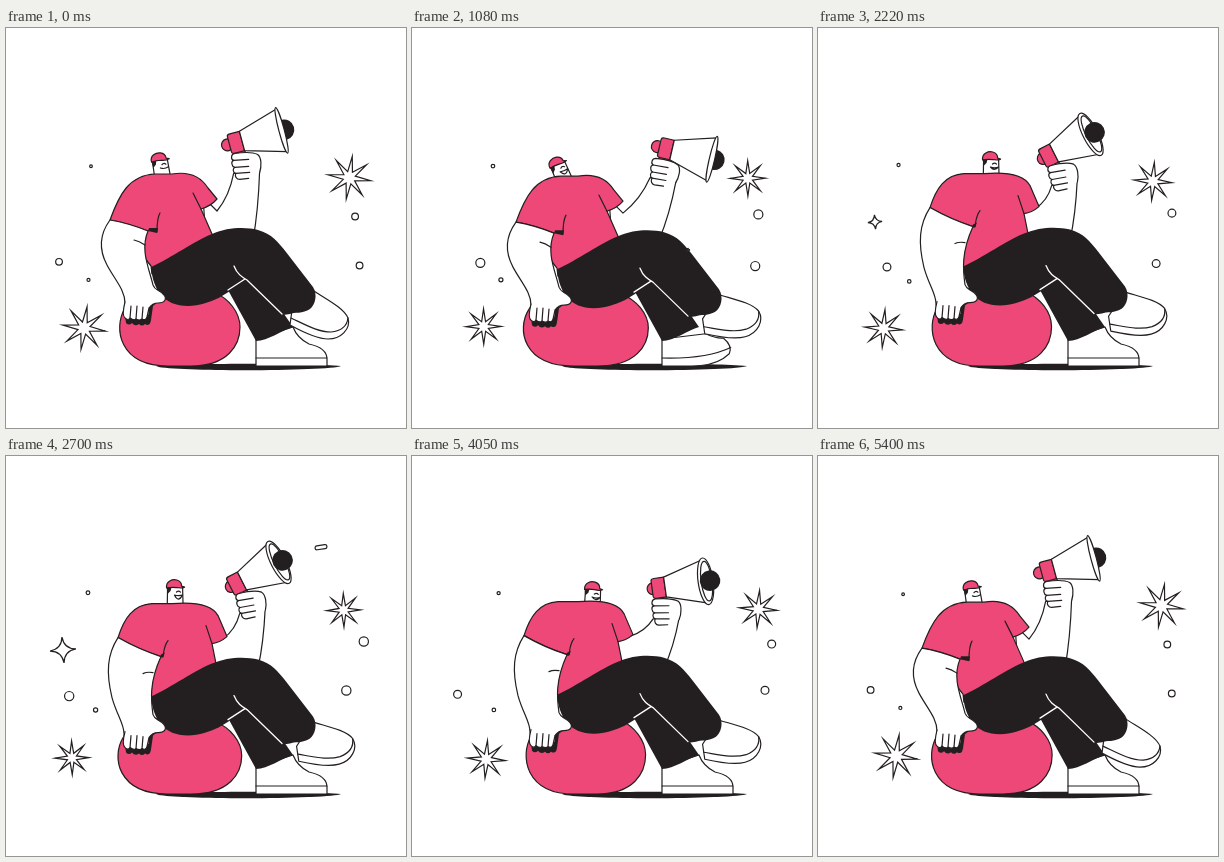
These frames come from a looping animation (400 by 400 pixels, 5.43 s). An HTML page:

```html
<!DOCTYPE html>
<html lang="en">
<head>
<meta charset="utf-8">
<title>Megaphone</title>
<style>
  html, body { margin: 0; width: 100%; height: 100%; overflow: hidden; background: #fff; }
  svg { display: block; width: 100vw; height: 100vh; }
  .w, .p, .l { stroke: #231f20; stroke-width: 1.2; stroke-linejoin: round; stroke-linecap: round; }
  .w { fill: #fff; }
  .p { fill: #ee4878; }
  .l { fill: none; }
  .k { fill: #231f20; }
  .s { fill: none; stroke: #fff; stroke-width: 1.3; stroke-linecap: round; }
  #bits .w { stroke-linejoin: miter; stroke-miterlimit: 8; }
</style>
</head>
<body>
<svg viewBox="0 0 400 400">
  <path class="k" d="M150 338.500C185 335 300 335 335 338C325 343 175 344 150 338.500Z"/>
  <path id="ball" class="p" d="M119 280C107 300 113 338 162 338H185C222 338 234 317 234 299C234 284 222 270 209 265C180 255 130 258 119 280Z"/>

  <path id="backArm" class="w"/>
  <g id="horn">
    <path class="p" d="M-11 8L-10 19H1L0 8Z"/>
    <circle id="knob" class="p" r="6"/>
    <path class="p" d="M-13 -8Q-13 -10 -10 -10H0V10H-10Q-13 10 -13 8Z"/>
    <circle id="ballBack" class="k" r="10.300"/>
    <path class="w" d="M0 -10L41 -22V22L0 10Z"/>
    <ellipse id="rim" class="w" cx="41" ry="23.500"/>
    <ellipse id="rimIn" class="w" cx="42" ry="20"/>
    <circle id="ballFront" class="k" r="10.300"/>
  </g>
  <g id="fist">
    <path class="w" d="M16 6C18 0 18 -9 14 -12C8 -15 -2 -14 -9 -13C-13 -12 -13 -7 -10 -6C-13 -5 -12 0 -9 1C-11 2 -11 6 -8 7C-9 10 -7 13 -4 13L5 12"/>
    <path class="l" d="M-10 -6L5 -7M-9 1L5 0M-8 7L6 6"/>
  </g>

  <g id="head">
    <path class="w" d="M-7 -5L-7 18H9L8 -5Z"/>
    <path class="k" d="M-8 -5H-3L-4 -1L-7 2Z"/>
    <path class="p" d="M-8 -4C-9 -11 -2 -13 2 -12C6 -11 7 -8 7 -6L10 -5Q7 -3.500 2 -4.500Q-3 -5 -8 -4Z"/>
    <path class="l" d="M2 0Q4 -2 6 0"/>
    <path id="mouth" class="w"/>
  </g>

  <g id="body">
    <path id="shirt" class="p"/>
    <path id="folds" class="l"/>
    <path id="shade" class="k"/>
  </g>

  <path id="shoe" class="w"/>
  <path id="sole" class="l"/>
  <path class="k" d="M222 262L240 250L278 286L287 299C276 302 262 313 250 313Z"/>

  <g id="legs">
    <g id="kick">
      <path class="w" d="M308 263C320 271 338 280 342 290C345 301 335 311 322 311C311 311 295 303 284 297L286 282Z"/>
      <path class="l" d="M285 290C300 297 312 304 325 304C335 303 341 298 342 290"/>
    </g>
    <path class="k" d="M145 239C165 230 190 212 206 206C222 199 240 199 252 202C266 206 272 214 280 224L307 259C312 267 309 277 304 281C297 286 288 284 284 286L277 287L238 252C222 266 205 277 182 278C158 278 147 262 145 239Z"/>
    <path class="s" d="M228 238C231 246 236 249 241 252L276 286M222 262L239 251"/>
  </g>

  <g id="front">
    <path class="k" d="M119 288L120 295Q123 298 126 295Q129 299 133 296Q136 299 139 296Q144 299 145 292L147 278L152 274H140Z"/>
    <path id="arm" class="w"/>
    <path class="w" d="M119 274C117 282 116 288 119 290Q122 293 124 290Q128 293 130 291Q134 293 136 291Q140 293 141 289L143 280"/>
    <path class="l" d="M124 290L125 278M130 291L131 278M136 291L137 279"/>
    <path id="crease" class="l"/>
  </g>

  <g id="bits"></g>
</svg>
<script>
const LOOP = 5430, STEP = 30, TAU = Math.PI * 2;
const $ = id => document.getElementById(id);
const set = (id, name, v) => $(id).setAttribute(name, v);
const place = (id, x, y, turn = 0) => set(id, "transform", `translate(${x} ${y}) rotate(${turn})`);
const show = (id, on) => set(id, "visibility", on ? "visible" : "hidden");

const wave = x => Math.cos(TAU * x);
const clamp = x => Math.max(0, Math.min(1, x));
const ease = x => { x = clamp(x); return x * x * (3 - 2 * x); };
const ramp = (t, a, b) => ease((t - a) / (b - a));
const swell = (t, a, b, c, d) => ramp(t, a, b) * (1 - ramp(t, c, d));
const bump = d => .5 + .5 * Math.cos(Math.PI * Math.min(1, Math.abs(d)));

// Blend of two paths with the same commands
function mix([a, b], p) {
  const num = /-?[\d.]+/g, to = b.match(num);
  let i = 0;
  return a.replace(num, v => (+v + (to[i++] - v) * p).toFixed(2));
}

// Leaning back, then sitting upright
const thumb = "L119 287L143 287L143 280C145 277 148 275 152 275C159 275 161 271 158 267C153 261 149 263 147 257";
const shapes = {
  shirt: [
    "M104 192C113 167 123 147 149 146L166 146C184 143 195 149 202 160L211 171Q205 178 195 181L206 206L206 240L146 246L145 238C136 228 132 216 142 203Q122 195 104 192Z",
    "M112 180C118 161 127 147 146 146L166 146C190 144 206 147 212 158L221 179Q214 185 206 186L210 206L210 240L146 246L145 238C142 226 145 210 155 199Q133 192 112 180Z"],
  folds: [
    "M154 185C151 190 151 198 151 204M187 165L195 181",
    "M162 183C158 188 158 193 157 199M200 168L206 186"],
  shade: [
    "M142 203L151 205L152 200L143 200Z",
    "M154 200L157 200L159 195L155 197Z"],
  arm: [
    `M104 192C93 207 93 222 101 237C109 252 119 262 119 275${thumb}C143 240 134 222 142 203Q122 195 104 192Z`,
    `M112 180C101 197 100 215 106 240C111 258 118 266 118 276${thumb}C145 243 143 225 155 199Q133 192 112 180Z`],
  crease: ["M128 212Q133 213 139 217", "M137 216Q141 214 147 215"]
};
// Flat on the ground, then toes curled up
const shoe = [
  "M250 311L250 338L290 338C300 338 312 338 321 338L321 331C321 322 312 318 303 316C297 313 290 307 287 299Z",
  "M250 311L250 338L276 338C290 338 300 335 308 328C316 324 320 318 318 313C314 308 308 310 303 309C296 308 291 306 287 299Z"];
const sole = ["M250 330C275 330 300 330 321 330", "M250 330C280 331 304 326 318 316"];

// x, y, reach, phase, radius
const dots = [
  [58, 237, 13.5, .31, 4], [353.5, 187, 7.5, .65, 4], [347, 236, 9, .88, 4],
  [83.5, 137.5, 3.5, .82, 1.6], [86, 253, 5.5, .36, 1.8]];
const stars = [[72, 301, .94], [340.5, 152, .82]];
// x, y, peak time, angle
const flecks = [[337, 209, 1740, 47], [338, 222, 4430, 45], [315, 83, 2560, -8]];

function starPath(x, y, r, n, inner, turn, curve) {
  const at = (rad, i) => {
    const a = turn + i * TAU / n;
    return `${x + rad * Math.cos(a)} ${y + rad * Math.sin(a)}`;
  };
  let d = "M" + at(r, 0);
  for (let i = 0; i < n; i++) {
    d += (curve ? "Q" : "L") + at(r * inner, i + .5) + (curve ? " " : "L") + at(r, i + 1);
  }
  return `<path class="w" d="${d}Z"/>`;
}

function drawBits(t, ph) {
  const u = t / LOOP;
  let out = "";
  for (const [x, y, reach, phase, r] of dots) {
    const cx = x + reach * wave(u - phase), cy = y + reach * .25 * wave(u - phase - .25);
    out += `<circle class="w" cx="${cx}" cy="${cy}" r="${r * (1 - .16 * wave(ph))}"/>`;
  }
  for (const [x, y, phase] of stars) {
    const cx = x + 6.5 * wave(u - phase), cy = y + 2.5 * wave(u - phase + .25);
    out += starPath(cx, cy, 19.2 + 2.4 * wave(ph - .96), 8, .29, .06 + .08 * wave(ph));
  }
  const glint = (x, y, r) => r > 1 ? starPath(x, y, r, 4, .13, -.08, true) : "";
  for (let i = 0; i < 3; i++) out += glint(57, 194, 19 * bump((t - 480 - 2030 * i) / 500));
  out += glint(276, 222, 14 * bump((t - 1500) / 560));

  for (const [x, y, peak, turn] of flecks) {
    const v = (t - peak) / 340;
    if (Math.abs(v) >= 1) continue;
    const s = Math.cos(v * Math.PI / 2), w = 15 * s, h = 2 + 2.5 * s;
    out += `<rect class="w" x="${-w / 2}" y="${-h / 2}" width="${w}" height="${h}" rx="${h / 2}"
      transform="translate(${x} ${y + 20 * v}) rotate(${turn})"/>`;
  }
  $("bits").innerHTML = out;
}

function spin(ox, oy, x, y, deg) {
  const a = deg * TAU / 360, c = Math.cos(a), s = Math.sin(a);
  return [ox + x * c - y * s, oy + x * s + y * c];
}

function drawArm(p, low, dy) {
  const x = 236 + (24 - 7 * p) * low, y = 113 + 9 * low + p * (12 - 3 * low);
  const turn = -15 - 12 * p + (28 - 9 * p) * low;
  place("horn", x, y, turn);
  set("knob", "cx", -15 + 3 * p);
  set("rim", "rx", 2.7 + 4.8 * p);
  set("rimIn", "rx", 5.5 * p);
  show("rimIn", p > .1);
  for (const id of ["ballBack", "ballFront"]) {
    set(id, "cx", 43.5 + 2 * p);
    show(id, (id === "ballFront") === p > .5);
  }

  const tilt = (turn + 15) * .5;
  const [hx, hy] = spin(x, y, -5, 25, turn);
  place("fist", hx, hy, tilt);
  const [lx, ly] = spin(hx, hy, -10, 7, tilt), [rx, ry] = spin(hx, hy, 16, 4, tilt);
  const cx = 211 + 6 * p, cy = 183 - 2 * p + dy, ex = 247 + 5 * p;
  set("backArm", "d", `M${cx - 14} ${cy - 14}L${cx} ${cy}Q${(cx + lx) / 2 + 4} ${(cy + ly) / 2 + 4} ${lx} ${ly}
    L${rx} ${ry}Q${(rx + ex) / 2 + 2} ${(ry + 206) / 2 + 8} ${ex} 212H200Z`);
}

function drawHead(p, low, ph) {
  const x = 154 + 18 * p + low * (15 * p - 7) + 3.5 * p * wave(ph);
  place("head", x, 137 - p + low * (4 - 2 * p), -8 + 9 * p - low * (14 - 17 * p));
  const open = .5 - .5 * wave(ph);
  set("mouth", "d", `M0 3Q4 ${5 + 6 * open} 8 3Q4 ${5 - open} 0 3Z`);
}

function draw(t) {
  const ph = t * 3 / LOOP % 1;                       // three bounces per loop
  const p = swell(t, 1120, 1640, 4050, 4600);        // upright
  const low = swell(t, 600, 1050, 1150, 1700) + swell(t, 3600, 4050, 4500, 5100);
  const squash = .59 - wave(ph - .15), dy = 1.4 * squash;

  set("ball", "transform", `translate(174 338) scale(${1 + .025 * squash} ${1 - .015 * squash}) translate(-174 -338)`);
  for (const id in shapes) set(id, "d", mix(shapes[id], p));
  for (const id of ["body", "legs", "front"]) place(id, 0, dy);

  const lift = swell(ph, 0, .22, .64, .92);
  set("kick", "transform", `translate(${3 * lift} ${3.5 * lift}) rotate(${-16 * lift} 298 278)`);
  const curl = bump((ph - .57) / .08);
  set("shoe", "d", mix(shoe, curl));
  set("sole", "d", mix(sole, curl));

  drawArm(p, low, dy);
  drawHead(p, low, ph);
  drawBits(t, ph);
}

const start = performance.now();
function frame() {
  const t = (performance.now() - start) % LOOP;
  draw(Math.floor(t / STEP) * STEP);
  requestAnimationFrame(frame);
}
frame();
</script>
</body>
</html>
```
